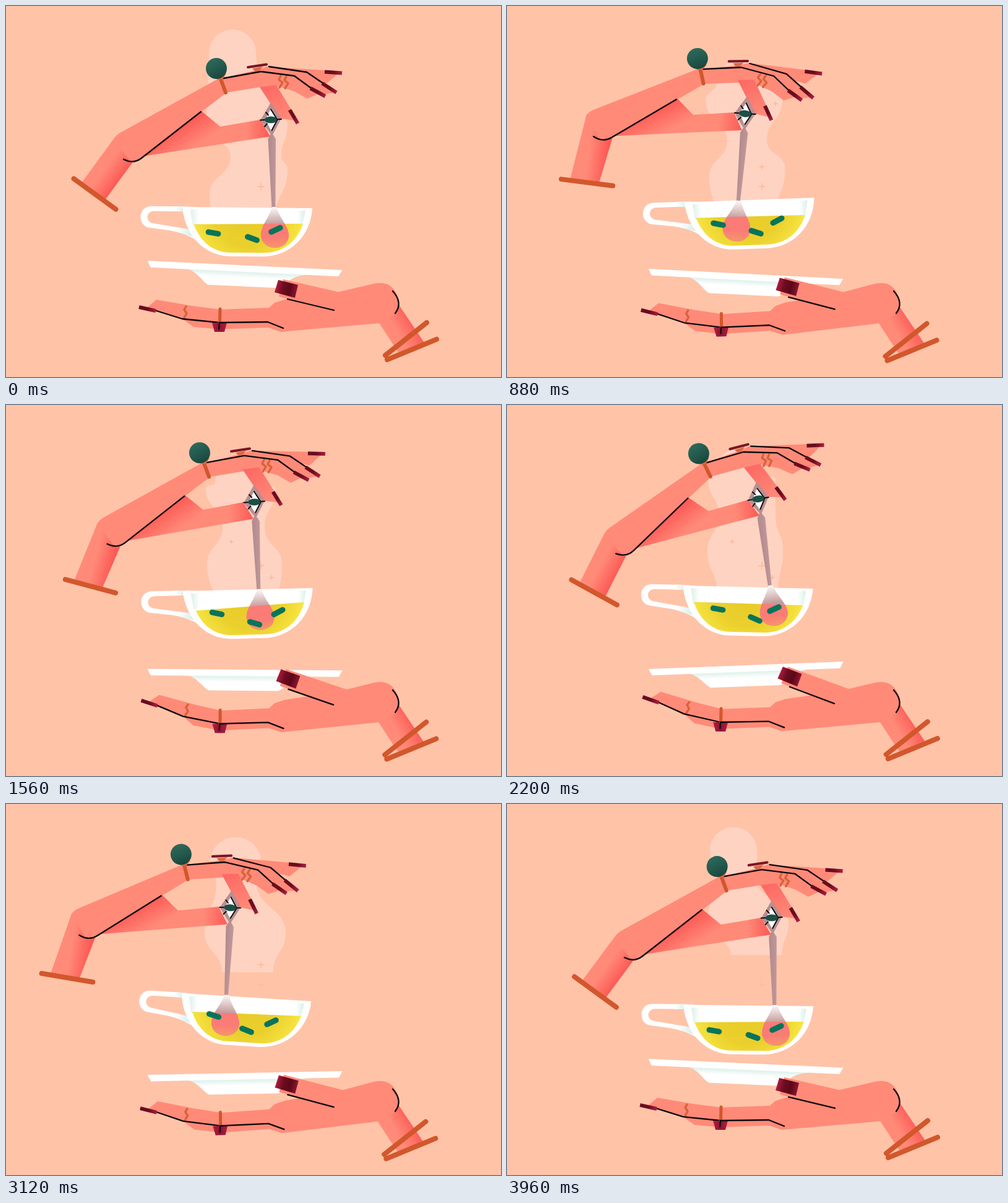
An HTML page with a canvas that plays this animation: 800x600 px, repeating every 4000 ms.

```html
<!DOCTYPE html>
<html lang="en">
<head>
<meta charset="utf-8">
<title>Stirring tea</title>
<style>
html, body { margin: 0; width: 100%; height: 100%; overflow: hidden; background: #ffc3a8; }
canvas { display: block; }
</style>
</head>
<body>
<canvas id="stage" width="800" height="600"></canvas>
<script>
const ctx = document.getElementById('stage').getContext('2d');
const LOOP = 4000;
const TIMES = [0, 560, 1200, 1560, 2200, 3120];
const ARM_TIMES = [0, 560, 1200, 1560, 2200, 2800, 3120];

const SKIN = '#ff8a78', RED = '#fd5a55', COPPER = '#d2572c', INK = '#0c0608';
const WINE = '#6a0c1e', BERRY = '#b01d3f', MINT = '#dcf0ea', GREEN = '#08745a', MAUVE = '#b78f91';

let now = 0;

// Smooth periodic interpolation through key values.
function key(...v) {
  const times = v.length === 7 ? ARM_TIMES : TIMES, n = v.length;
  const time = i => times[(i + n) % n] + LOOP * Math.floor(i / n);
  const val = i => v[(i + n) % n];
  let i = n - 1;
  while (times[i] > now) i--;
  const slope = j => (val(j + 1) - val(j)) / (time(j + 1) - time(j));
  const tangent = j => {
    const a = time(j) - time(j - 1), b = time(j + 1) - time(j);
    return (b * slope(j - 1) + a * slope(j)) / (a + b);
  };
  const h = time(i + 1) - time(i), s = (now - time(i)) / h, r = 1 - s;
  return val(i) * (1 + 2 * s) * r * r + val(i + 1) * s * s * (3 - 2 * s)
    + h * (tangent(i) * s * r * r - tangent((i + 1) % n) * s * s * r);
}

// Linear interpolation for something that lives for two loops.
function track(lap, ...v) {
  let i = TIMES.length - 1;
  while (TIMES[i] > now) i--;
  const end = TIMES[i + 1] ?? LOOP, s = (now - TIMES[i]) / (end - TIMES[i]);
  const a = v[TIMES.length * lap + i], b = v[TIMES.length * lap + i + 1];
  return a + (b - a) * s;
}

const rad = deg => deg * Math.PI / 180;

function fill(d, color, rule = 'nonzero') {
  ctx.fillStyle = color;
  ctx.fill(new Path2D(d), rule);
}

function stroke(d, color = INK, width = 2.3, cap = 'round') {
  ctx.strokeStyle = color;
  ctx.lineWidth = width;
  ctx.lineCap = cap;
  ctx.lineJoin = 'round';
  ctx.stroke(new Path2D(d));
}

function oval(x, y, rx, ry, color) {
  ctx.beginPath();
  ctx.ellipse(x, y, rx, ry, 0, 0, 2 * Math.PI);
  ctx.fillStyle = color;
  ctx.fill();
}

function lin(x0, y0, x1, y1, ...colors) {
  const g = ctx.createLinearGradient(x0, y0, x1, y1);
  colors.forEach((c, i) => g.addColorStop(i / (colors.length - 1), c));
  return g;
}

// Turns around (x, y), then moves by (dx, dy).
function turn(x, y, deg, dx = 0, dy = 0) {
  ctx.translate(x + dx, y + dy);
  ctx.rotate(rad(deg));
  ctx.translate(-x, -y);
}

function group(place, draw) {
  ctx.save();
  place();
  draw();
  ctx.restore();
}

function nail(x0, y0, x1, y1, width = 6) {
  stroke(`M${x0},${y0}L${x1},${y1}`, lin(x0, y0, x1, y1, WINE, WINE, BERRY), width, 'butt');
}

// Curve through [x, y] points where each one is a sideways extreme.
function swell(points) {
  return points.slice(1).map(([x, y], i) => {
    const [px, py] = points[i], mid = (y + py) / 2;
    return `C${px},${mid} ${x},${mid} ${x},${y}`;
  }).join('');
}

function steam(bottom) {
  const color = '#ffd3c2';
  const x = key(366, 373, 380, 378, 376, 371);
  const y = key(76, 101, 140, 126, 110, 95);
  const r = key(38, 37, 40, 40, 40, 41.5);
  const left = [[x - r, y]], right = [[x + r, y]];
  for (const lap of [1, 0]) {
    const bulge = track(lap, 305, 285, 268, 258, 235, 208, 192, 156, 148, 135, 120, 96, 77);
    const waist = track(lap, 350, 345, 340, 330, 305, 272, 243, 228, 207, 198, 180, 128, 115);
    left.push([track(lap, 329, 328, 326, 325, 324, 321, 324, 320, 322, 323, 325, 329, 328), bulge],
      [track(lap, 333, 335, 340, 340, 340, 349, 363, 358, 354, 350, 343, 340, 340), waist]);
    right.push([track(lap, 455, 451, 448, 446, 446, 452, 455, 449, 441, 436, 434, 413, 404), Math.min(bulge, 263)],
      [track(lap, 433, 436, 432, 438, 438, 432, 445, 430, 410, 418, 434, 405, 400), waist]);
  }
  group(() => {
    ctx.beginPath();
    ctx.rect(0, 0, 800, bottom);
    ctx.clip();
  }, () => {
    oval(x, y, r, r, color);
    right.reverse();
    fill(`M${left[0]}${swell(left)}L${right[0]}${swell(right)}Z`, color);
  });

  const sparkle = (x, y, size) => {
    if (size > 0.3) stroke(`M${x - size},${y}h${2 * size}M${x},${y - size}v${2 * size}`, '#ffbd9f', 1.8, 'butt');
  };
  sparkle(412, 292, key(6, 6, 4, 0, 0, 5));
  sparkle(412, 260, key(0, 3, 5, 5, 6, 5));
  sparkle(364, 221, key(2, 1, 0, 3, 4, 0));
  sparkle(429, 279, key(0, 1, 0, 4, 4, 0));
  sparkle(434, 158, key(0, 4, 2, 0, 0, 0));
}

const BOWL = 'M430,325C424,345 412,355 412,371C413,384 423,391 435,391C447,391 457,383 457,370C456,355 443,345 437,325Z';
const INNER = 'M-92,4C-86,50 -58,73 -28,73L26,73C64,73 91,46 94,4Z';

function cup(x, y, surface, placeGrip) {
  const place = () => turn(0, 0, key(0.5, -1.4, -2.2, -1.4, 1.4, 3.6), x, y);
  group(place, () => {
    fill('M-100,-1L-155,-1C-178,-1 -178,33 -156,34L-125,38C-108,41 -98,44 -80,54L-85,0Z'
      + 'M-98,7L-150,7C-165,7 -165,26 -150,27L-112,33C-105,34 -99,35 -90,38Z', '#fff', 'evenodd');
    fill('M-118,-1h18v8h-18Z', lin(-118, 0, -102, 0, '#fff', MINT));
    fill('M-114,33L-94,36L-84,49L-110,41Z', lin(-114, 36, -92, 44, '#fff', MINT));
    fill('M-105,0C-100,50 -65,79 -28,79L26,79C70,78 103,45 105,0Z', '#fff');
    fill('M-92,4L-70,4L-70,30L-88,30Z', lin(-92, 0, -78, 0, MINT, '#fff'));
    fill('M94,4L76,4L76,30L89,30Z', lin(93, 0, 81, 0, MINT, '#fff'));
  });

  // Part of the stage that lies below the liquid's surface.
  const submerge = () => ctx.clip(new Path2D(surface));
  group(() => { submerge(); place(); }, () => {
    const glow = ctx.createRadialGradient(0, 10, 20, 0, 10, 95);
    glow.addColorStop(0, '#e8cc29');
    glow.addColorStop(0.45, '#ebd02d');
    glow.addColorStop(0.8, '#f3df3c');
    glow.addColorStop(1, '#f9e948');
    fill(INNER, glow);
  });

  group(placeGrip, () => {
    fill('M429,204L436,215L435.5,326L429.5,326L423.5,215Z', lin(424, 0, 436, 0, '#b08a8d', '#c09799'));
    fill(BOWL, lin(433, 326, 434, 354, '#fbf6f5', '#c39b9b'));
  });
  group(() => { submerge(); placeGrip(); }, () =>
    fill(BOWL, lin(434, 355, 436, 393, '#fb7b76', '#fb7b76', '#f49a67')));

  const leaf = (px, py, deg) => group(() => turn(0, 0, deg, px, py), () => stroke('M-8,0H8', GREEN, 9));
  leaf(key(335, 341, 341, 341, 341, 336), key(367, 361, 344, 337, 330, 342), key(10, 10, 12, 12, 10, 18));
  leaf(key(398, 405, 400, 402, 401, 389), key(376, 372, 359, 353, 346, 366), key(20, 18, 18, 16, 24, 22));
  leaf(key(436, 434, 440, 440, 432, 429), key(362, 353, 341, 335, 330, 353), key(-25, -28, -28, -28, -25, -25));
}

function plate() {
  const angle = key(2.7, 3.6, 1.8, 0.45, -2.2, -1.1);
  group(() => turn(0, 0, angle, 386, key(419.5, 429, 434, 428, 421, 435)), () => {
    fill('M-100,8C-75,12 -70,28 -58,34L54,34C72,27 70,14 104,10Z', lin(0, 10, 0, 20, MINT, '#fff'));
    fill('M-157.5,0H157.5L152,10.5H-152Z', '#fff');
  });
}

function lowerHand() {
  const sink = key(0, 5, 8, 3.5, 1, 8.5);
  const palm = -sink / 258 * 180 / Math.PI;
  const curl = key(0, 0.2, 2.9, 5.6, 7.1, 1.5);

  group(() => ctx.translate(-sink * 0.2, sink * 0.2), () => {
    fill('M600,508L634,560L677,546L634,482Z', lin(662, 515, 634, 531, RED, SKIN));
    stroke('M613,565L680,512M616,572L696,539', COPPER, 8);
  });

  group(() => turn(603, 480, palm), () => {
    fill('M340,491L425,488L434,480L450,475L535,463L595,449Q626,443 634,474Q637,486 630,498L603,513L444,527L424,520L340,523Z', SKIN);
    group(() => turn(345, 512, curl - palm), () => {
      fill('M348,491L301,485L243,475L229,487L242,493L285,506L303,519L348,523Z', SKIN);
      stroke('M291,486L288,491L292,497L288,504', '#d9633a', 3.4);
      stroke('M240,492L285,506L345,512');
      nail(215, 487, 242, 493);
    });
    fill('M333,512H357L353,527H337Z', lin(333, 0, 357, 0, BERRY, '#8d1532', BERRY));
    stroke('M346,490L345.5,511', COPPER, 5);
    stroke('M345,512L423,511L448,521M345,512L344,522');
  });

  group(() => turn(603, 480, curl), () => {
    fill('M448,442L535,462L560,468L560,485L530,492L441,470Z', SKIN);
    fill('M440,443L472,451L467,472L434,463Z', lin(436, 453, 470, 461, BERRY, '#6d0c20', '#5b0818', '#8c1733'));
    stroke('M455,474L530,492');
  });
  stroke('M625,461Q642,480 629,497');
}

function upperArm(placeArm, toStage, lift) {
  // Part between the elbow and the bangle; its sides run parallel.
  const cx = key(143.5, 136.5, 126.5, 136.5, 141, 105, 99);
  const cy = key(304, 291.5, 284, 293, 303, 283, 281);
  const a = rad(key(36, 18.4, 2.7, 14.9, 28.9, 11, 9.5));
  const bangle = d => [cx + d * Math.cos(a), cy + d * Math.sin(a)];
  const outer = bangle(-28), edge = bangle(19), elbow = toStage(180, 207);
  const inner = edge.map((e, i) => e + 0.8 * (elbow[i] - outer[i]));
  const mx = (inner[0] + edge[0]) / 2, my = (inner[1] + edge[1]) / 2;
  const shade = lin(mx, my, mx - 30 * Math.cos(a), my - 30 * Math.sin(a), RED, SKIN);
  fill('M' + [toStage(184, 206), toStage(174, 215), outer, edge, inner, toStage(230, 230)].join('L') + 'Z', shade);
  stroke('M' + bangle(-42) + 'L' + bangle(42), COPPER, 8);

  group(placeArm, () => {
    // Lower finger
    group(() => turn(222, 243, lift * 0.28), () => {
      const d = 'M316,170L346,195L411,184L427,211L222,243Z';
      fill(d, lin(285, 192, 306, 226, RED, SKIN));
      fill('M385,188L411,184L427,211L390,217Z', lin(388, 0, 426, 0, 'rgba(253,90,85,0)', RED));
    });
    fill('M346,116L358,139L316,171L221,244Q210,255 202,253L174,216Q176,209 190,202Z', SKIN);
    stroke('M190,248Q206,256 219,246L315,171');
    // Back of the hand
    const spread = key(0, -2.5, -4.6, -2.2, 0, -4, -4.5);
    group(() => turn(412, 106, spread), () => {
      fill('M420,98L515,104L536,110L517,126L480,118Z', SKIN);
      nail(515, 106.5, 543, 108.5);
    });
    fill('M344,118L404,104L425,97L486,107L512,124L530,140L512,143L505,142L487,150L466,138L437,129L412,131L356,140Z', SKIN);
    stroke('M444,113L441,119L447,124L442,132M453,114L450,120L456,125L451,133', '#d9633a', 3.4);
    stroke('M351,117L412,106L466,113L496,135M425,98L486,107L514,126');
    nail(511, 125, 534, 140);
    nail(492, 133, 516, 146);
    // Rings
    stroke('M347,118L355,140', COPPER, 6);
    fill('M329,113L356,109L350,119L343,119Z', '#d9683f');
    oval(340, 101, 17, 17, lin(332, 86, 348, 117, '#2b6a5a', '#24594d', '#17453d'));
    fill('M398,101L415,98L409,105L403,106Z', '#d9683f');
    stroke('M391,99L421,94.5', '#7c1424', 4);
  });
}

function thumbAndEye() {
  fill('M410,131L437,128L472,186L443,182Z', lin(424, 130, 458, 184, '#fd6a64', SKIN));
  nail(458.5, 168, 471.5, 190);
  fill('M428,156L445,182L430,210L411,185Z', MAUVE);
  fill('M428,166L438,184L429,202L419,184Z', '#fff');
  stroke('M428,167L438.5,184L429.5,201M420,172L424,176.5M418,195L422,190.5', INK, 1.9);
  stroke('M411,184.5L445,183', INK, 1.9);
  oval(428, 184, 10, 5.5, '#1d4f45');
}

function draw(ms) {
  now = ms % LOOP;
  ctx.fillStyle = '#ffc3a8';
  ctx.fillRect(0, 0, 800, 600);

  const kx = key(412, 390, 374, 385, 382, 358, 354);
  const ky = key(106, 99, 96.5, 82, 76, 91, 94);
  const angle = key(0, 5, 7.1, -0.2, -6, 5, 6);
  const lift = key(0, -3, -5, -3, 0, -4.5, -5.5);
  const grip = key(0, -0.7, -1.5, -0.8, 0.2, -1.5, -1.6);
  const placeArm = () => turn(412, 106, angle, kx - 412, ky - 106);
  const placeGrip = () => { placeArm(); turn(428, 184, grip, 0, lift); };
  const toStage = (x, y) => {
    const c = Math.cos(rad(angle)), s = Math.sin(rad(angle)), dx = x - 412, dy = y - 106;
    return [kx + dx * c - dy * s, ky + dx * s + dy * c];
  };

  const cupX = key(390, 391, 391.5, 390.5, 389.5, 388.5);
  const cupY = key(326, 320.5, 306, 298.5, 294.5, 312.5);
  const yl = key(353, 346, 339, 333, 318.5, 336), yr = key(352, 348, 327, 319, 324, 343);
  const surface = `M302,${yl}L480,${yr}L520,${yr}V500H260V${yl}Z`;

  steam(cupY + 8);
  cup(cupX, cupY, surface, placeGrip);
  plate();
  lowerHand();
  upperArm(placeArm, toStage, lift);
  group(placeGrip, thumbAndEye);
}

function frame() {
  draw(performance.now());
  requestAnimationFrame(frame);
}
frame();
</script>
</body>
</html>
```
